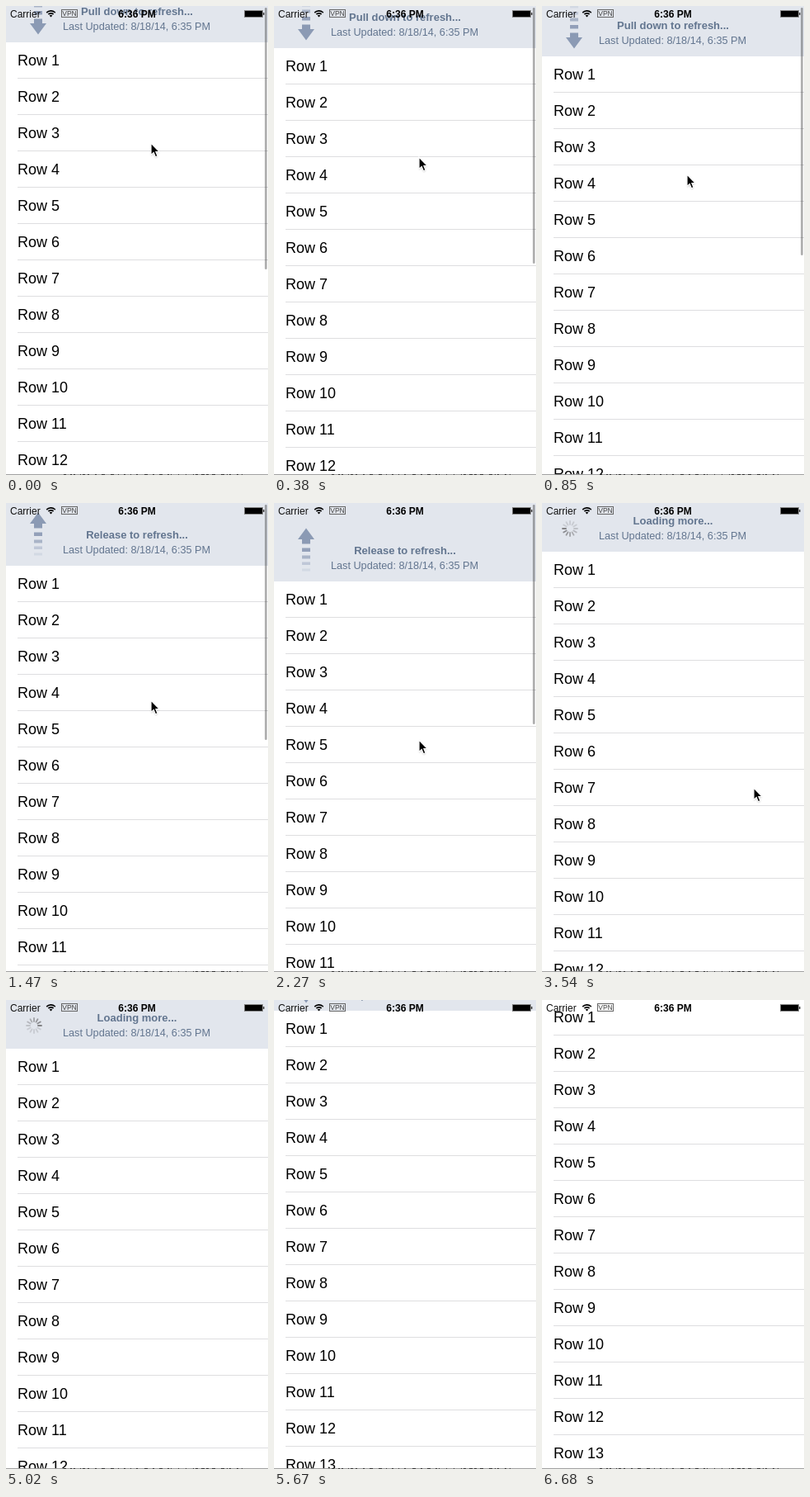
Animation of 318x568 px, one loop 6940 ms. Source, as an HTML page with a canvas:

```html
<!DOCTYPE html>
<html lang="en">
<head>
<meta charset="utf-8">
<title>Pull to refresh</title>
<style>
html, body { margin: 0; width: 100%; height: 100%; overflow: hidden; background: #fff; }
canvas { display: block; width: 318px; height: 568px; }
</style>
</head>
<body>
<canvas id="stage" width="318" height="568"></canvas>
<script>
const ctx = document.getElementById('stage').getContext('2d');
const W = 318, HEIGHT = 568, LOOP = 6940, ROW = 44;
const FONT = '"Liberation Sans", Arial, sans-serif';
const HEADER_TEXT = '#62758f', ARROW = '#8b9ab4';
const RELEASE_AT = 1015, LOAD_AT = 2540, DONE_AT = 5430;

const linear = p => p;
const easeOut = p => 1 - (1 - p) ** 3;
const easeInOut = p => p * p * (3 - 2 * p);

// Steps: [time, value, easing towards this value]
const pullSteps = [[0, 43.6], [850, 61], [1470, 76], [2170, 95], [LOAD_AT, 95],
  [2920, 59, easeOut], [DONE_AT, 59], [5780, -1, easeInOut]];
const cursorX = [[0, 176], [2700, 176], [3540, 257, easeInOut], [3880, 299, easeOut]];
const cursorY = [[0, 166], [850, 204], [1470, 239], [2170, 287], [2700, 287],
  [3540, 345, easeInOut], [3880, 388, easeOut]];

function valueAt(steps, t) {
  for (let i = 1; i < steps.length; i++) {
    const [t0, a] = steps[i - 1], [t1, b, ease = linear] = steps[i];
    if (t < t1) return a + (b - a) * ease((t - t0) / (t1 - t0));
  }
  return steps[steps.length - 1][1];
}

const progress = (t, start, length) => Math.min(1, Math.max(0, (t - start) / length));

function rect(color, x, y, w, h) {
  ctx.fillStyle = color;
  ctx.fillRect(x, y, w, h);
}

function text(str, x, y, font, color, align = 'left') {
  ctx.font = `${font} ${FONT}`;
  ctx.textAlign = align;
  ctx.fillStyle = color;
  ctx.fillText(str, x, y);
}

function polygon(points, fill) {
  ctx.beginPath();
  points.forEach(([x, y]) => ctx.lineTo(x, y));
  ctx.closePath();
  ctx.fillStyle = fill;
  ctx.fill();
}

function drawArrow(bottom, turn) {
  ctx.save();
  ctx.translate(39, bottom - 37);
  ctx.rotate(Math.PI * (1 + turn));
  polygon([[0, -27.5], [10, -14], [5, -14], [5, -8.5], [-5, -8.5], [-5, -14], [-10, -14]], ARROW);
  [[-3.5, 4.5, 0.9], [5.5, 4, 0.65], [13.5, 3.5, 0.4], [21.5, 3, 0.18]].forEach(([y, h, alpha]) => {
    ctx.globalAlpha = alpha;
    rect(ARROW, -5, y, 10, h);
  });
  ctx.restore();
}

function drawSpinner(bottom, t) {
  const lead = Math.floor(t / (1000 / 12)) + 3;
  ctx.save();
  ctx.translate(34, bottom - 28);
  ctx.lineWidth = 1.8;
  ctx.lineCap = 'round';
  for (let i = 0; i < 12; i++) {
    const age = (lead - i + 120) % 12;
    const angle = i * Math.PI / 6, s = Math.sin(angle), c = -Math.cos(angle);
    ctx.strokeStyle = `rgba(125,125,128,${Math.max(0.25, 0.95 - age * 0.1)})`;
    ctx.beginPath();
    ctx.moveTo(s * 5, c * 5);
    ctx.lineTo(s * 9, c * 9);
    ctx.stroke();
  }
  ctx.restore();
}

function drawHeader(bottom, t) {
  if (bottom <= 0) return;
  rect('#e2e6ed', 0, 0, W, bottom);
  const loading = t >= LOAD_AT && t < DONE_AT;
  const armed = t >= RELEASE_AT && t < LOAD_AT;
  const title = loading ? 'Loading more...' : armed ? 'Release to refresh...' : 'Pull down to refresh...';
  text(title, 159, bottom - 33, 'bold 13px', HEADER_TEXT, 'center');
  text('Last Updated: 8/18/14, 6:35 PM', 158.5, bottom - 15, '12.7px', HEADER_TEXT, 'center');
  if (loading) drawSpinner(bottom, t);
  else drawArrow(bottom, armed ? easeInOut(progress(t, RELEASE_AT, 180)) : 0);
}

function drawRows(top) {
  for (let i = 0; i < 14; i++) {
    const y = top + i * ROW;
    rect('#fff', 0, y, W, ROW);
    text(`Row ${i + 1}`, 14, y + 28, '18px', '#000');
    rect('#dedee0', 14, y + 43, W - 14, 1);
  }
}

function drawStatusBar() {
  text('Carrier', 5, 14, '12px', '#111');
  text('6:36 PM', 159, 14, 'bold 12px', '#000', 'center');

  ctx.strokeStyle = '#000';
  ctx.lineWidth = 1.7;
  [4.2, 7.2].forEach(r => {
    ctx.beginPath();
    ctx.arc(54.5, 13, r, -Math.PI * 0.76, -Math.PI * 0.24);
    ctx.stroke();
  });
  polygon([[54.5, 13.6], [52.7, 11.4], [54.5, 10.7], [56.3, 11.4]], '#000');

  ctx.strokeStyle = '#666';
  ctx.lineWidth = 1;
  ctx.strokeRect(67.5, 4.5, 19, 9);
  text('VPN', 77, 12, '8.5px', '#444', 'center');

  ctx.strokeStyle = '#8a8a8a';
  ctx.strokeRect(289.5, 5.5, 22, 8);
  rect('#000', 290, 6, 21, 7);
  rect('#444', 312, 8, 1.5, 3);
}

function drawScrollbar(bottom, t) {
  const alpha = 0.34 * (1 - progress(t, 2700, 350));
  if (alpha > 0) {
    ctx.beginPath();
    ctx.roundRect(314.2, 2, 2.5, 361 - bottom, 1.25);
    ctx.fillStyle = `rgba(0,0,0,${alpha})`;
    ctx.fill();
  }
}

function drawCursor(t) {
  if (t >= 3910) return;
  ctx.save();
  ctx.translate(Math.round(valueAt(cursorX, t)), Math.round(valueAt(cursorY, t)));
  ctx.shadowColor = 'rgba(0,0,0,.3)';
  ctx.shadowBlur = 2;
  ctx.shadowOffsetY = 1;
  polygon([[0, 0], [0, 14.5], [3.2, 11.6], [5.4, 16.8], [8, 15.7], [5.9, 10.6], [10.2, 10.6]], '#000');
  ctx.shadowColor = 'transparent';
  ctx.strokeStyle = '#fff';
  ctx.lineWidth = 1.2;
  ctx.stroke();
  ctx.restore();
}

function drawBottomEdge() {
  rect('#a0a0a0', 0, 567, W, 1);
  let seed = 7;
  for (let x = 70; x < 292;) {
    seed = (seed * 73 + 41) % 257;
    const w = 1 + seed % 4;
    rect('#333', x, 567, w, 1);
    x += w + 2 + seed % 7;
  }
}

function draw(t) {
  const bottom = Math.round(valueAt(pullSteps, t));
  rect('#fff', 0, 0, W, HEIGHT);
  drawHeader(bottom, t);
  drawRows(bottom);
  drawStatusBar();
  drawScrollbar(bottom, t);
  drawCursor(t);
  drawBottomEdge();
}

const start = performance.now();
function tick() {
  draw((performance.now() - start) % LOOP);
  requestAnimationFrame(tick);
}
tick();
</script>
</body>
</html>
```
